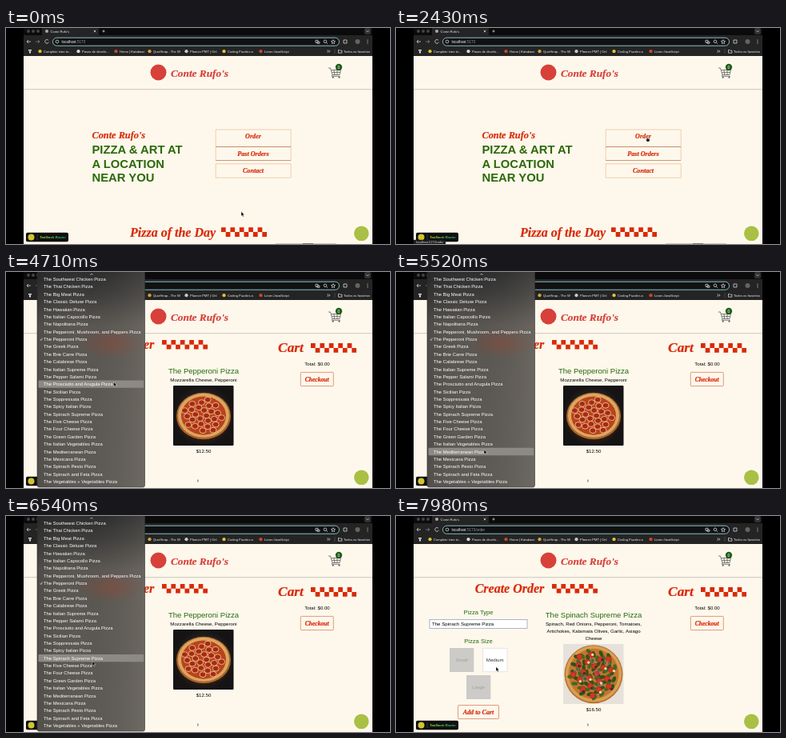
An HTML page that plays this animation: 480x270 px, repeating every 8000 ms.

```html
<!DOCTYPE html>
<html lang="en">
<head>
<meta charset="utf-8">
<title>Pizza order</title>
<style>
  html, body { margin: 0; width: 100%; height: 100%; overflow: hidden; background: #000; }
  svg { display: block; width: 100vw; height: 100vh; }
  text { font-family: "Liberation Sans", Arial, sans-serif; font-size: 6.1px; white-space: pre; }
  .script { font: italic bold 8.1px "Liberation Serif", serif; fill: #d92a08; stroke: #d92a08; stroke-width: .2px; }
  .title { font-size: 16px; }
  .brand { font-size: 13.3px; fill: #d8403a; stroke: #d8403a; }
  .mid { text-anchor: middle; }
  .green { fill: #256a0c; }
  .hero { font-weight: bold; font-size: 14.8px; fill: #2c6909; }
  .bar { font-size: 4.1px; fill: #f2f2f2; }
  .btn { fill: none; stroke: #cf5a35; stroke-width: .6; }
  .link { fill: none; stroke: #e0a273; stroke-width: .5; }
  .off { fill: #cdcbc8; }
  .offText { fill: #a19f9c; }
  .icon { fill: none; stroke: #d5d5d5; stroke-width: .8; }
  #rows text { font-size: 5.85px; fill: #fff; }
</style>
</head>
<body>
<svg viewBox="0 0 480 270" preserveAspectRatio="none">
  <defs>
    <g id="checks" fill="none" stroke="#d92a08" stroke-width="5.8" stroke-dasharray="5.7">
      <path d="M0 3H57M5.7 8.8H57"/>
    </g>
    <linearGradient id="menuFill" x2="0" y2="1">
      <stop stop-color="#2a2a2a"/><stop offset=".12" stop-color="#3d3c3b"/>
      <stop offset=".26" stop-color="#5a5651"/><stop offset="1" stop-color="#5d5a55"/>
    </linearGradient>
    <linearGradient id="menuSide">
      <stop stop-color="#000" stop-opacity=".12"/><stop offset=".5" stop-color="#888" stop-opacity="0"/>
      <stop offset="1" stop-color="#fff0dc" stop-opacity=".1"/>
    </linearGradient>
    <radialGradient id="menuGlow"><stop stop-color="#b03c20" stop-opacity=".3"/><stop offset="1" stop-color="#b03c20" stop-opacity="0"/></radialGradient>
    <radialGradient id="table"><stop stop-color="#4a4644"/><stop offset="1" stop-color="#151313"/></radialGradient>
    <linearGradient id="lime"><stop stop-color="#a3e635"/><stop offset="1" stop-color="#10b981"/></linearGradient>
  </defs>
  <rect width="480" height="270"/>

  <!-- browser -->
  <path fill="#0b0b0b" d="M22 0H458V10H22z"/>
  <path fill="#242424" d="M22 9H458V35H22zM45 0H116V10H45z"/>
  <g fill="#444"><circle cx="28" cy="4" r="2"/><circle cx="34" cy="4" r="2"/><circle cx="40" cy="4" r="2"/></g>
  <circle cx="51" cy="4" r="2" fill="#aaa"/>
  <text class="bar" x="55.5" y="5.6">Conte Rufo's</text>
  <path class="icon" d="M109.7 2.7l2.6 2.6m0-2.6l-2.6 2.6M120.5 4h3M122 2.5v3"/>
  <rect x="448" y="0" width="8" height="8" rx="2" fill="#333"/>
  <path class="icon" d="M450.5 3.3l1.5 1.5 1.5-1.5"/>
  <path class="icon" d="M31 17h-5l2-2m-2 2l2 2M53 15.3a2.4 2.4 0 1 0 .4 2.4"/>
  <path class="icon" stroke-opacity=".5" d="M37 17h5l-2-2m2 2l-2 2"/>
  <rect x="58.5" y="12.2" width="358" height="10" rx="5" fill="#111" stroke="#88bdca"/>
  <circle class="icon" cx="64" cy="17" r="1.9"/>
  <text x="69.5" y="18.7" style="font-size:4.6px" fill="#fff">localhost<tspan fill="#999">:5173<tspan id="path"></tspan></tspan></text>
  <path class="icon" d="M387 15.3h3v3h-3zm2 2h3v2h-3zM400.5 18.3l1.6 1.5M409 14.7l.8 1.6 1.8.2-1.3 1.2.3 1.8-1.6-.9-1.6.9.3-1.8-1.3-1.2 1.8-.2zM422 15h4v4h-4z"/>
  <circle class="icon" cx="399" cy="16.8" r="1.8"/>
  <circle cx="439.5" cy="17" r="3" fill="#6a625b"/>
  <g fill="#ddd"><circle cx="452" cy="15" r=".6"/><circle cx="452" cy="17" r=".6"/><circle cx="452" cy="19" r=".6"/></g>
  <path fill="#ddd" d="M28 27h4v1.5h-4zM29 29h2v2.5h-2z"/>
  <g id="marks"></g>
  <path class="icon" d="M401.5 27.6l1.5 1.5-1.5 1.5m2-3l1.5 1.5-1.5 1.5M415.5 27.5h1.5l.7.7h2.2v3h-4.4z"/>
  <path stroke="#666" stroke-width=".5" d="M411 26v6"/>
  <text class="bar" x="422" y="30.7">Todos os favoritos</text>

  <!-- page header -->
  <path fill="#fef8ec" d="M22 35H458V270H22z"/>
  <circle cx="190.5" cy="55.5" r="10" fill="#d8403a"/>
  <text class="script brand mid" x="242" y="61">Conte Rufo's</text>
  <path stroke="#bdbcb8" stroke-width=".8" d="M22 76.7H458"/>
  <path fill="none" stroke="#5f5f5f" stroke-width=".8" d="M403 50h2.5l2.5 8.5h9l1.5-6H406.5M407.3 55.4h10.4M410 52.5l.6 6M414 52.5v6M408 58.5l-.7 1.8h10.5"/>
  <circle cx="408.7" cy="61.7" r="1" fill="#555"/><circle cx="416.5" cy="61.7" r="1" fill="#555"/>
  <circle cx="416" cy="49" r="4.2" fill="#215c1d"/>
  <text class="mid" x="416" y="50.9" style="font-size:5px" fill="#fff">0</text>

  <g id="home">
    <text class="script" x="107.5" y="138" style="font-size:12.3px">Conte Rufo's</text>
    <text class="hero" x="107.5" y="157.2">PIZZA &amp; ART AT</text>
    <text class="hero" x="107.5" y="174.7">A LOCATION</text>
    <text class="hero" x="107.5" y="192.2">NEAR YOU</text>
    <path class="link" d="M262.2 127h94v21.5h-94zM262.2 148.5h94v17h-94zM262.2 169.8h94v17.4h-94z"/>
    <path stroke="#a8603c" stroke-width=".5" d="M262 148.5h94M262 165.5h94"/>
    <text class="script mid" x="309" y="138">Order</text>
    <text class="script mid" x="309" y="159.7">Past Orders</text>
    <text class="script mid" x="309" y="181">Contact</text>
    <text class="script title" x="155" y="261">Pizza of the Day</text>
    <use href="#checks" x="269" y="249.2"/>
    <path fill="#c9c7c3" d="M337 269h76v1h-76z"/><path fill="#77736e" d="M371 269h13v1h-13z"/>
  </g>

  <g id="order">
    <text class="script title mid" x="142" y="95.5">Create Order</text>
    <use href="#checks" x="195" y="84.8"/>
    <text class="script mid" x="356" y="100" style="font-size:17.4px">Cart</text>
    <use href="#checks" x="381" y="89"/>
    <text class="mid" x="389" y="117">Total: $0.00</text>
    <rect class="btn" x="368.3" y="125.4" width="41" height="17.2" rx="1"/>
    <text class="script mid" x="388.7" y="136.8" style="font-size:7.6px">Checkout</text>

    <text class="mid green" x="103" y="123.4" style="font-size:7.6px">Pizza Type</text>
    <rect x="42" y="129.5" width="122" height="11" fill="#fff" stroke="#8798b8" stroke-width=".7"/>
    <text id="picked" x="45" y="137.1"></text>
    <text class="mid green" x="103" y="159.3" style="font-size:7.6px">Pizza Size</text>
    <path class="off" d="M67 165h30.3v30H67zM88 199h30.3v30H88z"/>
    <rect x="108.7" y="165.2" width="30.3" height="29.6" fill="#fff" stroke="#d8d6d2" stroke-width=".6"/>
    <text class="mid offText" x="82" y="182.2">Small</text>
    <text class="mid" x="123.7" y="182.2" fill="#333">Medium</text>
    <text class="mid offText" x="103" y="216.2">Large</text>
    <rect class="btn" x="77.5" y="236.5" width="51" height="17" rx="1"/>
    <text class="script mid" x="103" y="247.8">Add to Cart</text>

    <g id="pepperoni"></g>
    <g id="spinach"></g>
    <path fill="#555" d="M239.4 259.5h1v3h-1z"/>
  </g>

  <!-- devtools -->
  <rect x="25" y="255.7" width="53" height="11.6" rx="2" fill="#101010"/>
  <circle cx="31.5" cy="261.5" r="4" fill="#d2c52e"/>
  <path stroke="#555" stroke-width=".5" d="M39 258v7"/>
  <text x="42" y="263" style="font:italic bold 4.15px 'Liberation Sans',sans-serif" fill="url(#lime)">TanStack Router</text>
  <circle cx="444.3" cy="256.8" r="9.3" fill="#a9c044"/>

  <g id="status">
    <path fill="#1d1d1d" d="M22 264.8h38a2 2 0 0 1 2 2V270H22z"/>
    <text x="25" y="268.8" style="font-size:3.8px" fill="#ddd">localhost:5173/order</text>
  </g>

  <g id="menu">
    <rect x="39" y="-4" width="134.5" height="273" rx="2.5" fill="url(#menuFill)" stroke="#2b2b2b" stroke-width=".6"/>
    <rect x="39" y="-4" width="134.5" height="273" rx="2.5" fill="url(#menuSide)"/>
    <path fill="url(#menuGlow)" d="M90 70h83v38H90z"/>
    <rect id="hover" x="40.5" width="131.7" height="9.37" rx="1" fill="#8d8a85"/>
    <path class="icon" d="M105.3 3.6l1.6-1.6 1.6 1.6"/>
    <path class="icon" d="M42.7 84.2l1.1 1.4 1.6-3"/>
    <g id="rows"></g>
  </g>

  <g id="cursor">
    <path id="arrow" d="M0 0V5.6L1.3 4.5 2.2 6.5 3.2 6 2.3 4.1H4z" stroke="#fff" stroke-width=".4"/>
    <path id="hand" d="M-.6 0V3L-2 2.6-.4 5.6H2.6L3.3 2.4 .5 1.7V0z" stroke="#fff" stroke-width=".4"/>
  </g>
</svg>
<script>
  const LOOP = 8000, OPEN_PAGE = 2880, OPEN_MENU = 3720, PICK = 6800;
  const ROW = 9.37, FIRST = 4.3;
  const $ = id => document.getElementById(id);
  const show = (id, on) => { $(id).style.display = on ? '' : 'none'; };

  const marks = [
    [42, 'Complete intro to...', '#e0c02a'], [90, 'Pasos de develo...', '#d8d8d8'],
    [137, 'Home | Katabase', '#c4492d'], [179, 'QuizHeap - The W', '#d9a23a'],
    [225, 'Planner PMT | Onl', '#c9c9c9'], [272, 'Coding Puzzles a', '#e5c52f'],
    [318, 'Learn JavaScript', '#d6402f']
  ];
  $('marks').innerHTML = marks.map(([x, s, c]) =>
    `<circle cx="${x + .5}" cy="29.2" r="2.1" fill="${c}"/><text class="bar" x="${x + 5}" y="30.7">${s}</text>`).join('');

  const pizzas = ('Southwest Chicken,Thai Chicken,Big Meat,Classic Deluxe,Hawaiian,Italian Capocollo,Napolitana,' +
    'Pepperoni; Mushroom; and Peppers,Pepperoni,Greek,Brie Carre,Calabrese,Italian Supreme,Pepper Salami,' +
    'Prosciutto and Arugula,Sicilian,Soppressata,Spicy Italian,Spinach Supreme,Five Cheese,Four Cheese,' +
    'Green Garden,Italian Vegetables,Mediterranean,Mexicana,Spinach Pesto,Spinach and Feta,Vegetables + Vegetables')
    .split(',').map(s => `The ${s.replace(/;/g, ',')} Pizza`);
  $('rows').innerHTML = pizzas.map((s, i) =>
    `<text x="47" y="${FIRST + ROW * (i + .5) + 2.1}">${s}</text>`).join('');

  const disc = (x, y, r, fill, more = '') =>
    `<circle cx="${x.toFixed(1)}" cy="${y.toFixed(1)}" r="${r}" fill="${fill}" ${more}/>`;

  // Toppings spread evenly on a golden-angle spiral.
  function scatter(n, reach, cx, cy, draw) {
    let out = '';
    for (let i = 0; i < n; i++) {
      const r = reach * Math.sqrt((i + .5) / n), a = i * 2.4;
      out += draw(cx + r * Math.cos(a), cy + r * Math.sin(a), i);
    }
    return out;
  }

  function card(name, lines, price, top, picture) {
    return `<text class="mid green" x="247" y="127" style="font-size:9.5px">${name}</text>` +
      lines.map((s, i) => `<text class="mid" x="247" y="${137.2 + 9 * i}">${s}</text>`).join('') +
      picture + `<text class="mid" x="247" y="${top + 84.4}">${price}</text>`;
  }

  $('pepperoni').innerHTML = card('The Pepperoni Pizza', ['Mozzarella Cheese, Pepperoni'], '$12.50', 142,
    '<rect x="209" y="142" width="75.5" height="75" rx="1" fill="url(#table)"/>' +
    '<g transform="translate(247 180) scale(1 .86)">' +
    disc(0, 3, 34.5, '#2a1710') + disc(0, 0, 34, '#a8652f') + disc(0, -.8, 32, '#dda660') + disc(0, -.5, 28, '#b8431d') +
    scatter(26, 25, 0, -.5, (x, y) => disc(x, y, 4, '#a62a19', 'stroke="#efc084" stroke-width="1"')) + '</g>');

  $('spinach').innerHTML = card('The Spinach Supreme Pizza',
    ['Spinach, Red Onions, Pepperoni, Tomatoes,', 'Artichokes, Kalamata Olives, Garlic, Asiago', 'Cheese'], '$16.50', 160,
    '<rect x="209" y="160" width="75.5" height="75" rx="1" fill="#e6e1da"/>' +
    disc(247, 197.7, 36.5, '#b87332') + disc(247, 197.3, 35, '#d8a052') + disc(247, 197.3, 31.5, '#c3762f') +
    scatter(55, 30, 247, 197.3, (x, y, i) =>
      `<ellipse cx="${x}" cy="${y}" rx="4" ry="2.3" fill="${i % 2 ? '#3f6a24' : '#2d5319'}" transform="rotate(${i * 67} ${x} ${y})"/>`) +
    scatter(21, 28, 247, 197.3, (x, y) => disc(x, y, 3.5, '#cb3a22', 'stroke="#98281a" stroke-width=".6"')) +
    scatter(17, 27, 249, 199, (x, y, i) => disc(x, y, 1.7, i % 2 ? '#ead9a4' : '#42283a')) +
    scatter(6, 23, 245, 196, (x, y) => disc(x, y, 3, 'none', 'stroke="#a9718f" stroke-width=".8"')));

  // time, x, y of the pointer tip
  const stops = [
    [0, 294, 229.5], [450, 294, 229.5], [960, 305, 196], [1230, 305, 196], [1850, 314, 136.5],
    [2900, 314, 136.5], [3420, 146, 140], [3800, 146, 140], [4450, 134.5, 137.5], [4720, 134.5, 137.5],
    [5480, 110, 221.5], [5800, 110, 231], [6400, 108, 181.5], [6850, 108, 181.5], [7600, 125, 188.5], [8000, 125, 188.5]
  ];
  function pointer(t) {
    const i = stops.findIndex(s => s[0] > t);
    const [t0, x0, y0] = stops[i - 1], [t1, x1, y1] = stops[i];
    const p = (t - t0) / (t1 - t0), e = p * p * (3 - 2 * p);
    return [x0 + (x1 - x0) * e, y0 + (y1 - y0) * e];
  }

  function frame(now) {
    const t = now % LOOP, [x, y] = pointer(t);
    const home = t < OPEN_PAGE, menu = t >= OPEN_MENU && t < PICK, picked = t >= PICK;
    const link = home && x > 262 && x < 356 && y > 127 && y < 148.5;
    show('home', home);
    show('order', !home);
    show('status', link);
    show('menu', menu);
    show('pepperoni', !picked);
    show('spinach', picked);
    show('hand', link);
    show('arrow', !link);
    $('path').textContent = home ? '' : '/order';
    $('picked').textContent = pizzas[picked ? 18 : 8];
    $('hover').setAttribute('y', FIRST + ROW * Math.floor((y - FIRST) / ROW));
    $('cursor').setAttribute('transform', `translate(${x.toFixed(2)} ${y.toFixed(2)})`);
    requestAnimationFrame(frame);
  }
  frame(performance.now());
</script>
</body>
</html>
```
